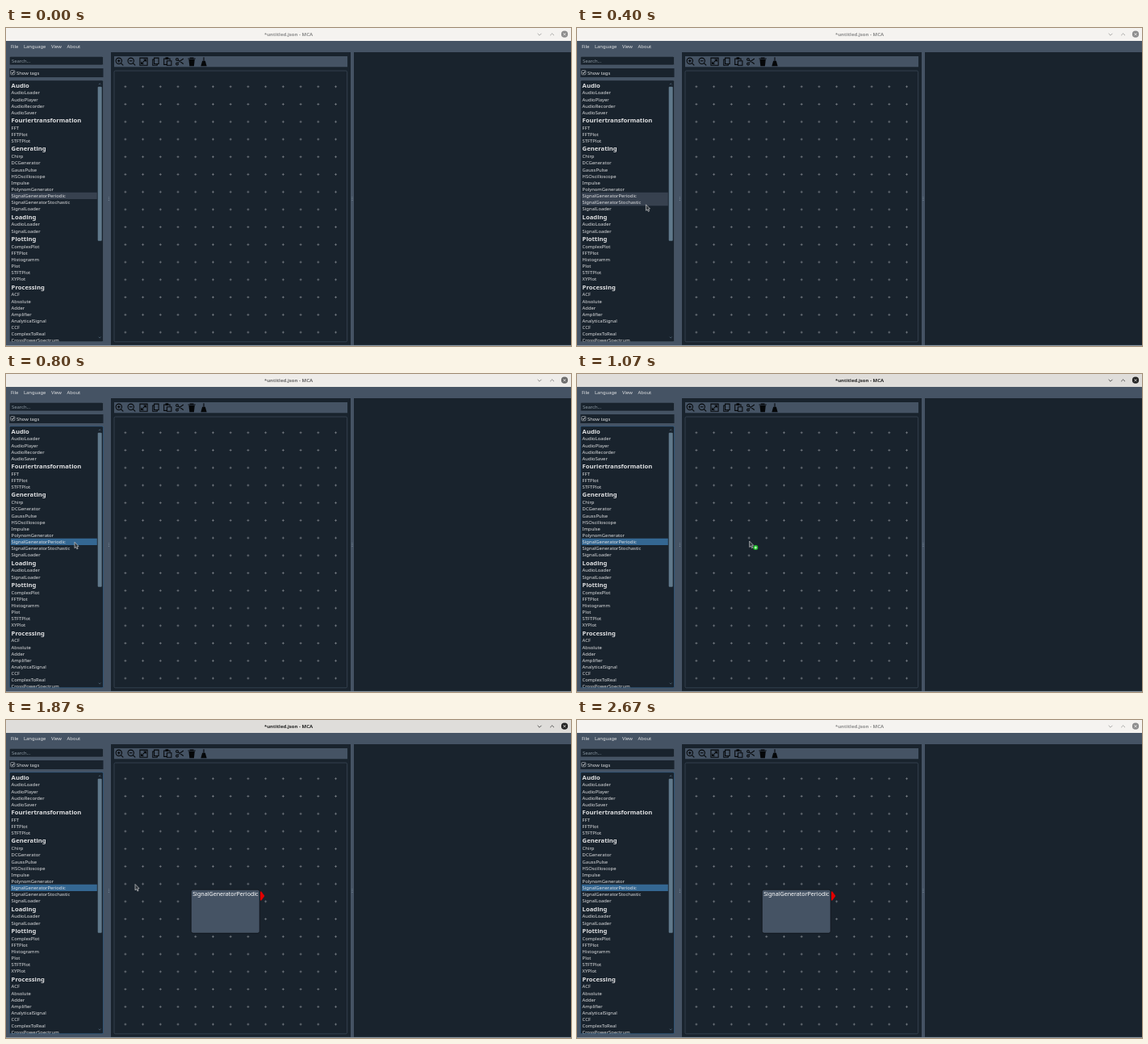
Write an HTML page with a canvas that moves like this. It is 700 px wide and 394 px high and loops after 2740 ms.

```html
<!DOCTYPE html>
<html lang="en">
<head>
<meta charset="utf-8">
<title>Node editor</title>
<style>
html, body { margin: 0; width: 100%; height: 100%; overflow: hidden; background: #19232d; }
canvas { display: block; width: 700px; height: 394px; }
</style>
</head>
<body>
<canvas id="stage"></canvas>
<script>
(() => {
const LOOP = 2740, FPS = 15;
const DARK = '#19232d', SLATE = '#455364', HOVER = '#37414f', SELECTED = '#346792';
const TEXT = '#e0e1e3', HANDLE = '#60798b';
const FONT = '"Noto Sans", "Open Sans", sans-serif';
const ROW = 8.13, HEAD = 10.96;

// Moments of the story in ms
const PRESS = 800, DROP = 1470, GONE = 2070, BLUR = 2670;

const groups = {
  Audio: 'AudioLoader AudioPlayer AudioRecorder AudioSaver',
  Fouriertransformation: 'FFT FFTPlot STFTPlot',
  Generating: 'Chirp DCGenerator GaussPulse HSOscilloscope Impulse PolynomGenerator ' +
    'SignalGeneratorPeriodic SignalGeneratorStochastic SignalLoader',
  Loading: 'AudioLoader SignalLoader',
  Plotting: 'ComplexPlot FFTPlot Histogramm Plot STFTPlot XYPlot',
  Processing: 'ACF Absolute Adder Amplifier AnalyticalSignal CCF ComplexToReal CrossPowerSpectrum'
};
const rows = [];
let rowTop = 65.3;
function addRow(name, h) {
  rows.push({ name, y: rowTop, h });
  rowTop += h;
}
for (const [title, items] of Object.entries(groups)) {
  addRow(title, HEAD);
  items.split(' ').forEach(name => addRow(name, ROW));
}
const periodic = rows.find(r => r.name === 'SignalGeneratorPeriodic');

// Toolbar icons on a 12 x 12 box: stroked outline, optional filled part
const lens = 'M9 5A4 4 0 1 1 1 5A4 4 0 1 1 9 5M8 8L11 11M3 5H7';
const icons = [
  [lens + 'M5 3V7'],
  [lens],
  ['M1 1H11V11H1ZM3 9L9 3M6 3H9V6M3 6V9H6'],
  ['M4 1H10V9H4ZM4 3H2V11H8V9'],
  ['M5 10H1V2H9V4M5 5H11V11H5Z', 'M3 0H7V3H3Z'],
  ['M11 2L4 7M11 9L4 4M4 3a1.5 1.5 0 1 1-3 0a1.5 1.5 0 1 1 3 0m0 6a1.5 1.5 0 1 1-3 0a1.5 1.5 0 1 1 3 0'],
  ['M1 2H11M4 2V1H8V2', 'M2 3H10L9 12H3Z'],
  ['M6 0V5', 'M4 5H8L10 12H2Z']
].map(parts => parts.map(d => new Path2D(d)));

const arrow = new Path2D('M0 0V7.4L1.7 6L2.9 8.6L4.1 8L3 5.6L5 5.2Z');

// Pointer legs: each moves on from the end of the one before
const legs = [
  { from: 0, to: 200, x: 85.5, y: 220.7, power: 1 },
  { from: 340, to: 730, x: 85, y: 208.3, power: 1 },
  { from: 900, to: 1330, x: 225, y: 207, power: 5 },
  { from: 1740, to: GONE, x: 60, y: 198, power: 1 }
];

function pointerAt(t) {
  let x = 87, y = 205;
  for (const leg of legs) {
    const u = Math.min(1, Math.max(0, (t - leg.from) / (leg.to - leg.from)));
    const k = 1 - (1 - u) ** leg.power;
    x += (leg.x - x) * k;
    y += (leg.y - y) * k;
  }
  return { x, y };
}

const canvas = document.getElementById('stage');
const c = canvas.getContext('2d');
const dpr = window.devicePixelRatio || 1;
canvas.width = 700 * dpr;
canvas.height = 394 * dpr;

function box(x, y, w, h, fill, border, radius = 0) {
  c.beginPath();
  c.roundRect(x, y, w, h, radius);
  if (fill) { c.fillStyle = fill; c.fill(); }
  if (border) { c.strokeStyle = border; c.lineWidth = .6; c.stroke(); }
}

function label(text, x, y, size = 5.87, color = TEXT, weight = 400, align = 'left') {
  c.font = `${weight} ${size}px ${FONT}`;
  c.textAlign = align;
  c.fillStyle = color;
  c.fillText(text, x, y);
}

function line(color, width, x1, y1, x2, y2) {
  c.beginPath();
  c.moveTo(x1, y1);
  c.lineTo(x2, y2);
  c.strokeStyle = color;
  c.lineWidth = width;
  c.stroke();
}

// Size is positive for a tip pointing down, negative for up
function chevron(color, x, y, size) {
  line(color, .7, x - size, y - size / 2, x, y + size / 2);
  line(color, .7, x, y + size / 2, x + size, y - size / 2);
}

function plus(color, x, y, r, width) {
  line(color, width, x - r, y, x + r, y);
  line(color, width, x, y - r, x, y + r);
}

function disc(x, y, r, color) {
  c.beginPath();
  c.arc(x, y, r, 0, 7);
  c.fillStyle = color;
  c.fill();
}

function titleBar(focus) {
  const mix = (a, b) => a + (b - a) * focus;
  const v = mix(245, 223), g = mix(140, 35);
  const back = `rgb(${v},${v - 2},${v - 5})`, ink = `rgb(${g},${g},${g})`;
  box(0, 0, 700, 16, back);
  label('*untitled.json - MCA', 350, 9.9, 6, ink, 700, 'center');
  chevron(ink, 661, 8, 2.4);
  chevron(ink, 676.6, 8, -2.4);
  disc(692, 7.7, 4.1, ink);
  line(back, .8, 690.4, 6.1, 693.6, 9.3);
  line(back, .8, 693.6, 6.1, 690.4, 9.3);
}

function sidebar(selected, hovered) {
  box(4.3, 35.3, 116.2, 10.6, DARK, '#52616f', 1.5);
  label('Search...', 7, 42.8, 5.87, '#8d9aa5');
  box(4.3, 50, 116.2, 11, DARK);
  box(5.7, 52.6, 5.2, 5.2, DARK, '#c3c8cd', 1);
  line(TEXT, .9, 6.8, 55.2, 8, 56.5);
  line(TEXT, .9, 8, 56.5, 10, 53.8);
  label('Show tags', 13, 57.6);

  box(4.3, 64.7, 116.2, 324, DARK, selected ? SELECTED : '#52616f', 1.5);
  c.save();
  c.beginPath();
  c.rect(4.8, 65, 115, 323.4);
  c.clip();
  for (const row of rows) {
    const mid = row.y + row.h / 2;
    if (selected && row === periodic) box(5.8, row.y, 107, row.h, SELECTED);
    else if (hovered.includes(row)) box(5.8, row.y, 107, row.h, HOVER);
    if (row.h === HEAD) label(row.name, 6.6, mid + 2.8, 7.67, TEXT, 700);
    else label(row.name, 6.6, mid + 2.15);
  }
  c.restore();
  box(113.7, 72.8, 5, 191, HANDLE, null, 1);
  chevron(HANDLE, 116.2, 69.4, -1.3);
  chevron(HANDLE, 116.2, 383.4, 1.3);
}

function workspace() {
  box(130, 30, 297, 362.8, DARK);
  box(431, 30, 269, 362.8, DARK);
  for (const x of [127.3, 429])
    for (let i = 0; i < 3; i++) box(x - .4, 209.5 + i * 1.8, .8, .8, '#8797a5');

  box(134, 35, 289, 13.3, SLATE);
  icons.forEach(([outline, solid], i) => {
    c.save();
    c.translate(135.2 + i * 14.9, 36.2);
    c.scale(.92, .92);
    c.strokeStyle = c.fillStyle = '#050709';
    c.lineWidth = 1.15;
    c.stroke(outline);
    if (solid) c.fill(solid);
    c.restore();
  });

  box(134, 53, 288.6, 335.8, DARK, SLATE, 1.5);
  for (let i = 0; i < 13; i++)
    for (let j = 0; j < 15; j++)
      plus('#8d9399', 147.9 + i * 21.72, 72.7 + j * 21.74, 1.5, .6);
}

function node() {
  box(229.3, 210.3, 84.9, 53.8, SLATE, '#06090c', 2.5);
  label('SignalGeneratorPeriodic', 231.2, 218.4, 7.1, '#fff');
  c.fillStyle = '#e00000';
  c.fill(new Path2D('M315 212.6h1.4l4 5.4l-4 5.4h-1.4z'));
}

function cursor(x, y, dragging) {
  c.save();
  c.translate(x, y);
  c.fillStyle = '#30363c';
  c.fill(arrow);
  c.strokeStyle = '#e8e8e8';
  c.lineWidth = .6;
  c.stroke(arrow);
  if (dragging) {
    disc(7.6, 8, 3, '#22c02c');
    plus('#fff', 7.6, 8, 1.6, .8);
  }
  c.restore();
}

function draw(t) {
  c.setTransform(dpr, 0, 0, dpr, 0, 0);
  box(0, 0, 700, 394, SLATE);
  box(0, 393.2, 700, .8, '#a9b1b8');

  const focus = t < BLUR ? Math.min(1, Math.max(0, (t - PRESS + 60) / 180)) : 0;
  titleBar(focus);
  label('File', 6, 25.2);
  label('Language', 22, 25.2);
  label('View', 56, 25.2);
  label('About', 75.6, 25.2);

  const { x, y } = pointerAt(t);
  const visible = t > 0 && t < GONE;
  const over = visible && x < 113 && rows.find(r => y >= r.y && y < r.y + r.h);
  sidebar(t >= PRESS, t < PRESS ? [periodic, over] : [over]);
  workspace();
  if (t >= DROP) node();
  if (visible) cursor(x, y, t > 930 && t < DROP);
}

function stepTime(t) {
  const step = Math.floor((t + 5) * FPS / 1000);
  return Math.min(BLUR, Math.round(step * 100 / FPS) * 10);
}

const start = performance.now();
function tick() {
  draw(stepTime((performance.now() - start) % LOOP));
  requestAnimationFrame(tick);
}
tick();
})();
</script>
</body>
</html>
```
